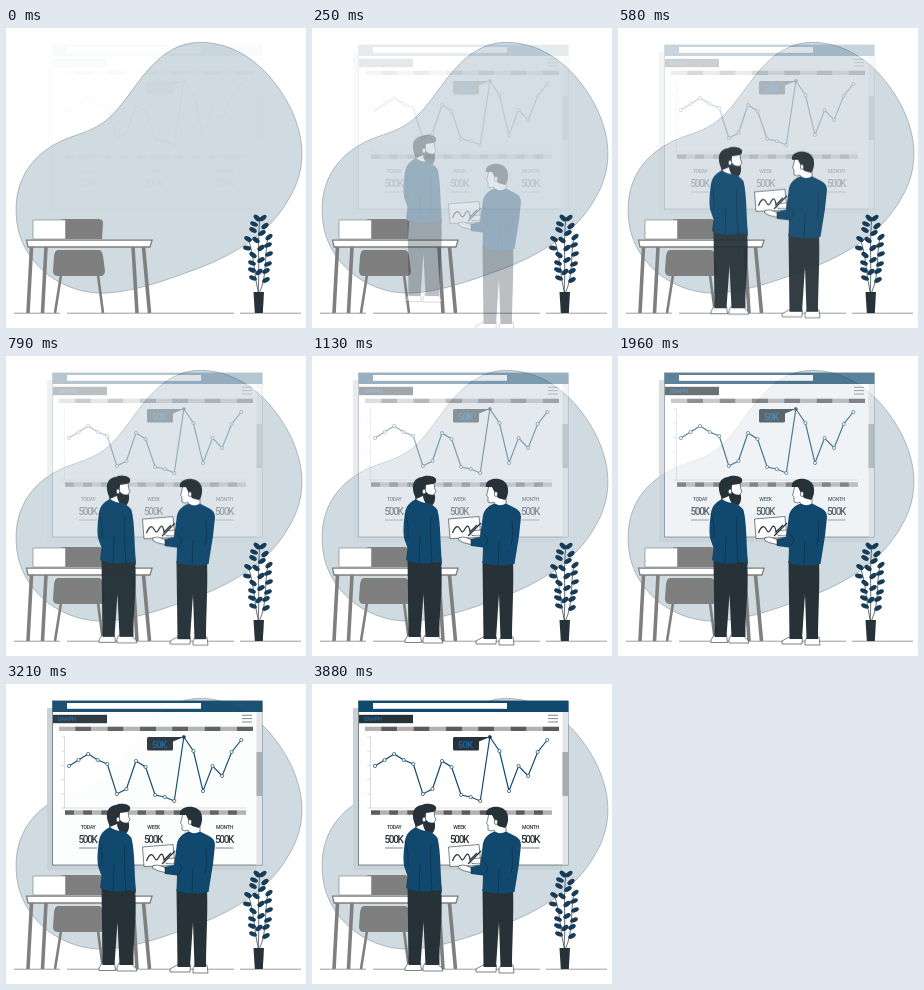
Recreate the animation shown at these times as an HTML page. Size 300 px wide and 300 px high, loop 4.43 s.

```html
<!DOCTYPE html>
<html lang="en">
<head>
<meta charset="utf-8">
<title>Office meeting</title>
<style>
html, body { margin: 0; width: 100%; height: 100%; overflow: hidden; background: #fff; }
svg { display: block; width: 100vw; height: 100vh; }
text { font-family: Roboto, "Liberation Sans", sans-serif; text-anchor: middle; fill: #263238; }
.label { font-size: 5.2px; font-weight: 500; letter-spacing: -.35px; }
.value { font-size: 10px; font-weight: 500; letter-spacing: -1.35px; }
.blue { fill: #11486d; }
.dark { fill: #263238; }
.grey { fill: #7f7f7f; }
.skin { fill: #fff; stroke: #263238; stroke-width: .6; stroke-linejoin: round; }
.thin { fill: none; stroke: #263238; stroke-width: .6; }
.pen { fill: none; stroke: #263238; stroke-width: 1.2; }
.seam { fill: none; stroke: #0b2c44; stroke-width: .6; }
#screen { animation: reveal 4430ms linear infinite; }
.man { animation: enter 4430ms linear infinite; }
#left { --from: -1; }
#right { --from: 1; }
@keyframes reveal {
  0% { opacity: .02; }
  1.8% { opacity: .04; }
  5.643% { opacity: .11; }
  13.093% { opacity: .23; }
  25.51% { opacity: .43; }
  42% { opacity: .66; }
  58.24% { opacity: .84; }
  72% { opacity: .95; }
  87.58%, 100% { opacity: 1; }
}
@keyframes enter {
  0%, 1.806% { opacity: 0; transform: translateY(calc(var(--from) * 21px)); }
  5.643% { opacity: .31; transform: translateY(calc(var(--from) * 13px)); }
  9.481% { opacity: .66; transform: translateY(calc(var(--from) * 6px)); }
  13.093% { opacity: .94; transform: translateY(calc(var(--from) * .8px)); }
  17% { opacity: .98; transform: translateY(calc(var(--from) * .2px)); }
  25.51%, 100% { opacity: 1; transform: none; }
}
</style>
</head>
<body>
<svg viewBox="0 0 300 300">
  <path fill="#cfdae1" stroke="#8496a2" stroke-width=".6" d="M195 14.3C235 15 265 43 283 77C299 108 301 140 284 169C263 208 222 230 185 243C150 256 118 266 92 265C50 263 16 232 11 195C6 157 22 129 55 113C73 105 91 103 107 86C131 62 149 14.3 195 14.3Z"/>

  <g id="screen">
    <path fill="#c9d1d6" d="M41 24H48V181H250V186H41Z"/>
    <rect x="46.5" y="17" width="209.5" height="164" fill="#fff" stroke="#455a64" stroke-width=".7"/>
    <rect x="250.5" y="28" width="5.5" height="152.6" fill="#e3e6e8"/>
    <rect x="250.5" y="68" width="5.5" height="44" fill="#a9adb0"/>
    <rect class="blue" x="46.5" y="16.8" width="210" height="11.2"/>
    <rect x="61" y="19" width="134" height="5.8" fill="#fff"/>
    <rect class="dark" x="47" y="30.8" width="54" height="8.4"/>
    <text x="60.5" y="37.3" style="font-size:6px;font-weight:600;letter-spacing:-.4px;fill:#1b6297">GRAPH</text>
    <path class="thin" d="M236 31.3H246M236 34.6H246M236 38H246"/>
    <g id="strips"></g>
    <path id="axes" fill="none" stroke="#b5bcc1" stroke-width=".5"/>
    <path class="dark" d="M142.5 53H165L178 53L167 57.5V65Q167 66.5 165.5 66.5H142.5Q141 66.5 141 65V54.5Q141 53 142.5 53Z"/>
    <text x="153" y="63.6" style="font-size:9.5px;font-weight:600;letter-spacing:-1px;fill:#1b6297">50K</text>
    <g id="chart"></g>
    <g id="stats"></g>
  </g>

  <g id="desk">
    <path class="thin" stroke-opacity=".8" d="M8 285.2H54M61 285.2H228M234 285.2H295"/>
    <path class="grey" d="M56 211L53 195Q53 191 58 191H92Q97 191 97 195L96 211Z"/>
    <path class="grey" d="M52 222H93Q96 222 97 228L99 243Q99 248 94 248H52Q47 248 47 243L48 228Q49 222 52 222Z"/>
    <path fill="none" stroke="#7f7f7f" stroke-width="2.6" d="M55 247L49 285M92 247L97 285"/>
    <path fill="none" stroke="#7f7f7f" stroke-width="3.6" d="M25.5 219L22 285M40 219L36.5 285M127 219L131 285M137.5 219L143.5 285"/>
    <path fill="#fff" stroke="#8c8c8c" stroke-width=".7" d="M27 192H59.5V211H27Z"/>
    <path fill="#fff" stroke="#7f7f7f" stroke-width="1.3" d="M20.5 212.2H146L144 219H22Z"/>
  </g>

  <g id="plant">
    <path fill="none" stroke="#263238" stroke-width=".7" d="M252 266C254 240 251 215 254 189M253 266C248 250 249 230 242 210M253 266C262 246 258 228 262 209"/>
  </g>
  <path class="dark" d="M247.5 264H258L256.8 285H248.8Z"/>

  <g class="man" id="left">
    <path class="skin" d="M96 279L93 284V286.5H109.5L108.5 279ZM113 279L111 283V287H131Q131 284 126.5 281V279Z"/>
    <path class="dark" d="M95.5 201H121L129.5 211C130.5 236 127 258 127.5 281H113.5L111.5 238L108.5 281H96.5Z"/>
    <path class="skin" d="M104 137L103 148H118L117 139Z"/>
    <path class="skin" d="M112 126H122L122.5 132L124 136L122 138V143H112Z"/>
    <path class="dark" d="M102 138C99 128 102 122 110 121C113 119.2 122 119.2 124 123Q125 127 121 128L114 129L113.5 135Q117 140 122.7 138.5C124 144 122 150 118 150Q112 148 111 140L104 143Z"/>
    <ellipse class="skin" cx="112" cy="135.5" rx="1.7" ry="2.5"/>
    <path class="blue" d="M104 143C98 146 94 150 93 157Q90.5 172 92 182L95.5 192L94 204Q109 210 120 206.5L121.5 212Q125 215 129 211.5L130 206C128 188 129 168 125.5 154Q122 149 116 147Q109 147 104 143Z"/>
    <path class="dark" d="M119.5 206L129.5 207L128.5 212Q124 215.5 121 212Z"/>
    <path class="seam" d="M119 160C118 174 119 192 120 207M108 180L107 208M93 157Q97 168 96 182"/>
  </g>

  <g class="man" id="right">
    <path class="skin" d="M171 281L164 285V288H184L184.5 281ZM189 281L187 285V289H202L201 281Z"/>
    <path class="dark" d="M170.5 205H201C202 230 200 260 200 283H188.5L187 238L184 283H171.5Z"/>
    <path class="skin" d="M177 129L175.5 136L174.5 139L176 141V146Q180 148 182 146L183 151H194V137Z"/>
    <path class="dark" d="M174 131Q173 126 178 124C184 121 193 123 195.5 130C197 136 195.5 141 193 144L186 142L182.5 136L180 131Z"/>
    <ellipse class="skin" cx="184" cy="138" rx="1.7" ry="2.5"/>
    <path class="skin" d="M136.5 163L167 160.5L169 181.5L138 182.5Z"/>
    <path class="pen" d="M140.5 177C143 170 146 169 148 173S151 177 153.5 172S158 173 158 176L165 169"/>
    <path class="blue" d="M183 147.5C175 150 171 155 170.5 163L168 181L157 183.5L159 190L171 191.5L170.5 207Q186 211.5 202.5 208L207 180L209 161Q209 155 203 152L194 147.5Q188 151 183 147.5Z"/>
    <path class="skin" d="M159 183.5L152 181L147 181.5L146.5 184L151 186.5L159 188.5ZM169 174L162 174.5L158 177.5L160 179.5L168 180Z"/>
    <path class="pen" d="M156 180L169 167"/>
    <path class="seam" d="M171 177Q180 185 171 191M200 164Q202 178 199 190M187 184L186 210"/>
  </g>
</svg>
<script>
const NS = "http://www.w3.org/2000/svg";
const $ = id => document.getElementById(id);

function add(parent, tag, attrs, label) {
  const el = document.createElementNS(NS, tag);
  for (const key in attrs) el.setAttribute(key, attrs[key]);
  if (label) el.textContent = label;
  return parent.appendChild(el);
}

function strip(x, y, width, height, count, darkFirst) {
  const step = width / count;
  for (let i = 0; i < count; i++) {
    const fill = (i % 2 === 0) === darkFirst ? "#5c5c5e" : "#b4b1b1";
    add($("strips"), "rect", { x: x + i * step, y, width: step, height, fill });
  }
}
strip(53, 42.7, 194, 4.3, 12, false);
strip(59, 126.3, 181, 4.5, 20, true);

let axes = "M58.5 52V124H240";
for (let i = 0; i < 6; i++) axes += `M55 ${53 + i * 14.2}H58.5`;
$("axes").setAttribute("d", axes);

const levels = [82, 76, 70, 76, 80, 110, 105, 77, 83, 111, 113, 117, 53, 67, 107, 82, 92, 68, 56];
const points = levels.map((y, i) => [63 + i * 9.57, y]);
add($("chart"), "polyline", { points: points.join(" "), fill: "none", stroke: "#11486d", "stroke-width": 1.2 });
points.forEach(([cx, cy]) => add($("chart"), "circle", {
  cx, cy, r: 1.6, fill: cy === 53 ? "#263238" : "#fff", stroke: "#11486d", "stroke-width": .7
}));

[["TODAY", 82], ["WEEK", 147.5], ["MONTH", 218.5]].forEach(([name, x]) => {
  add($("stats"), "text", { x, y: 145.4, class: "label" }, name);
  add($("stats"), "text", { x: x - .5, y: 158.8, class: "value" }, "500K");
  add($("stats"), "path", { d: `M${x - 9} 164H${x + 9}`, class: "thin" });
});

const leaves = [
  [257, 190, -40], [251, 190, 45], [248, 196, 25], [259, 198, -35],
  [247, 202, 30], [256, 205, -30], [263, 209, -40], [242, 211, 30],
  [250, 212, 35], [262, 217, -25], [241, 220, 15], [255, 220, -35],
  [263, 226, -25], [247, 227, 35], [255, 232, -30], [262, 236, -25],
  [246, 235, 25], [260, 243, -30], [246, 242, 20], [253, 244, -35],
  [247, 250, 25], [260, 252, -30]
];
leaves.forEach(([x, y, turn]) => add($("plant"), "ellipse", {
  rx: 4.1, ry: 2.3, fill: "#173c57", transform: `translate(${x} ${y}) rotate(${turn})`
}));
</script>
</body>
</html>
```
